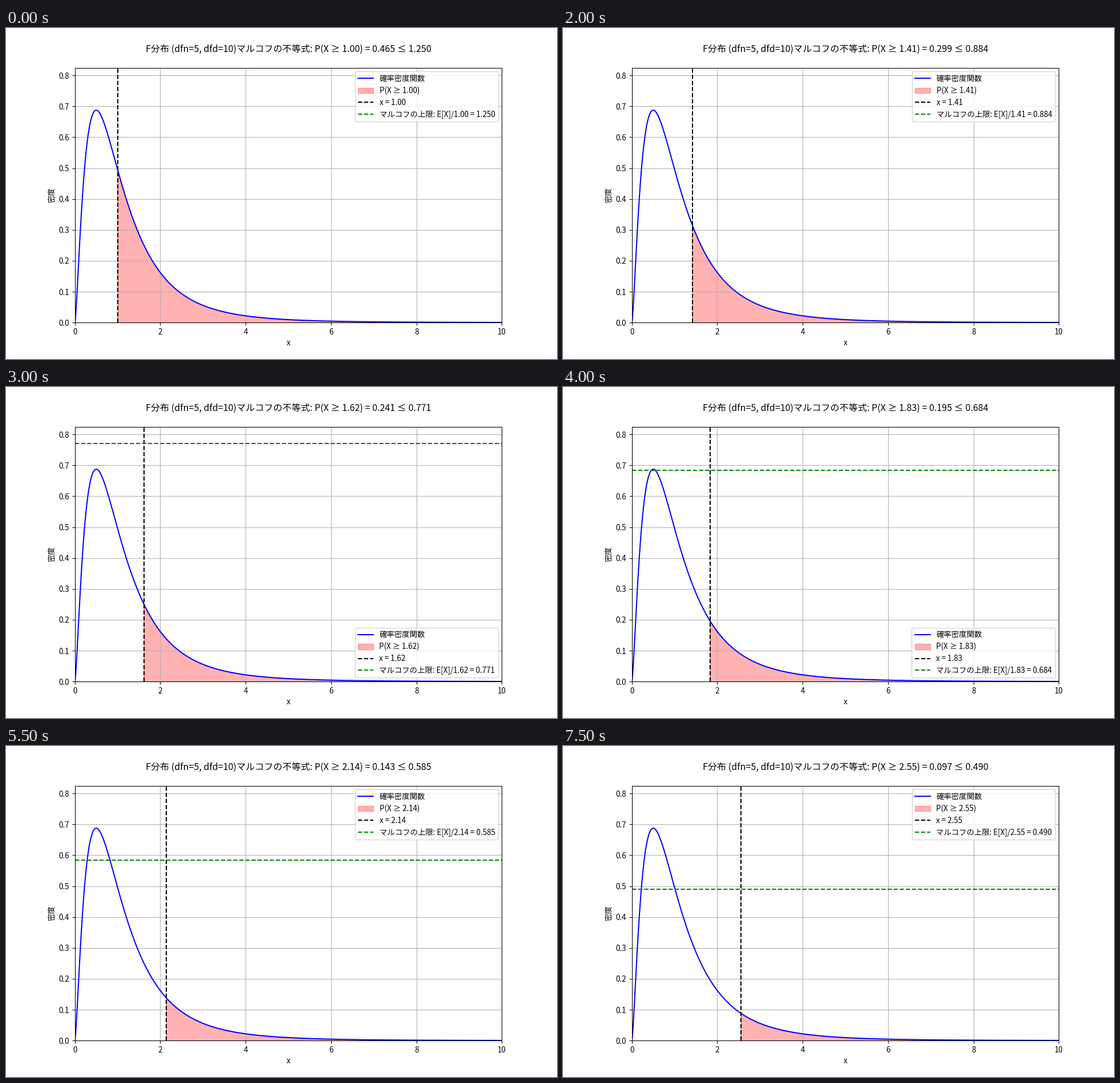
These frames come from a looping animation (966 px wide and 580 px high, 8000 ms). A matplotlib script:

```python
import math

import matplotlib.pyplot as plt
import numpy as np
from matplotlib.animation import FuncAnimation

plt.rcParams["font.family"] = "Noto Sans CJK JP"

DFN, DFD = 5, 10
MEAN = DFD / (DFD - 2)
FRAMES, INTERVAL = 16, 500
DPI = 96.6
BETA = math.gamma(DFN / 2) * math.gamma(DFD / 2) / math.gamma((DFN + DFD) / 2)


def pdf(x):
    r = DFN / DFD
    scale = r ** (DFN / 2) / BETA
    return scale * x ** (DFN / 2 - 1) * (1 + r * x) ** (-(DFN + DFD) / 2)


def tail(a, n=4000):
    """P(X >= a) by the midpoint rule on the incomplete beta integral."""
    u = DFD / (DFD + DFN * a)
    t = (np.arange(n) + 0.5) * u / n
    return u * np.mean(t ** (DFD / 2 - 1) * (1 - t) ** (DFN / 2 - 1)) / BETA


xs = np.linspace(0, 10, 1000)
ys = pdf(xs)

# The tiny margin keeps the pixel size from rounding down.
fig, ax = plt.subplots(figsize=(966.001 / DPI, 580.001 / DPI), dpi=DPI)


def draw(i):
    a = 1 + 3 * i / 29
    bound = MEAN / a
    ax.clear()
    ax.plot(xs, ys, color="blue", label="確率密度関数")
    part = np.linspace(a, 10, 1000)
    ax.fill_between(part, pdf(part), color="red", alpha=0.3,
                    label=f"P(X ≥ {a:.2f})")
    ax.axvline(a, color="black", linestyle="--", label=f"x = {a:.2f}")
    ax.axhline(bound, color="green", linestyle="--",
               label=f"マルコフの上限: E[X]/{a:.2f} = {bound:.3f}")
    ax.set_xlim(0, 10)
    ax.set_ylim(0, ys.max() * 1.2)
    ax.set_xlabel("x")
    ax.set_ylabel("密度")
    ax.set_title(f"F分布 (dfn={DFN}, dfd={DFD})マルコフの不等式: "
                 f"P(X ≥ {a:.2f}) = {tail(a):.3f} ≤ {bound:.3f}\n")
    ax.grid(True)
    ax.legend(loc="best")
    return []


anim = FuncAnimation(fig, draw, frames=FRAMES, init_func=lambda: draw(0),
                     interval=INTERVAL, repeat=True, repeat_delay=0)
plt.show()
```
